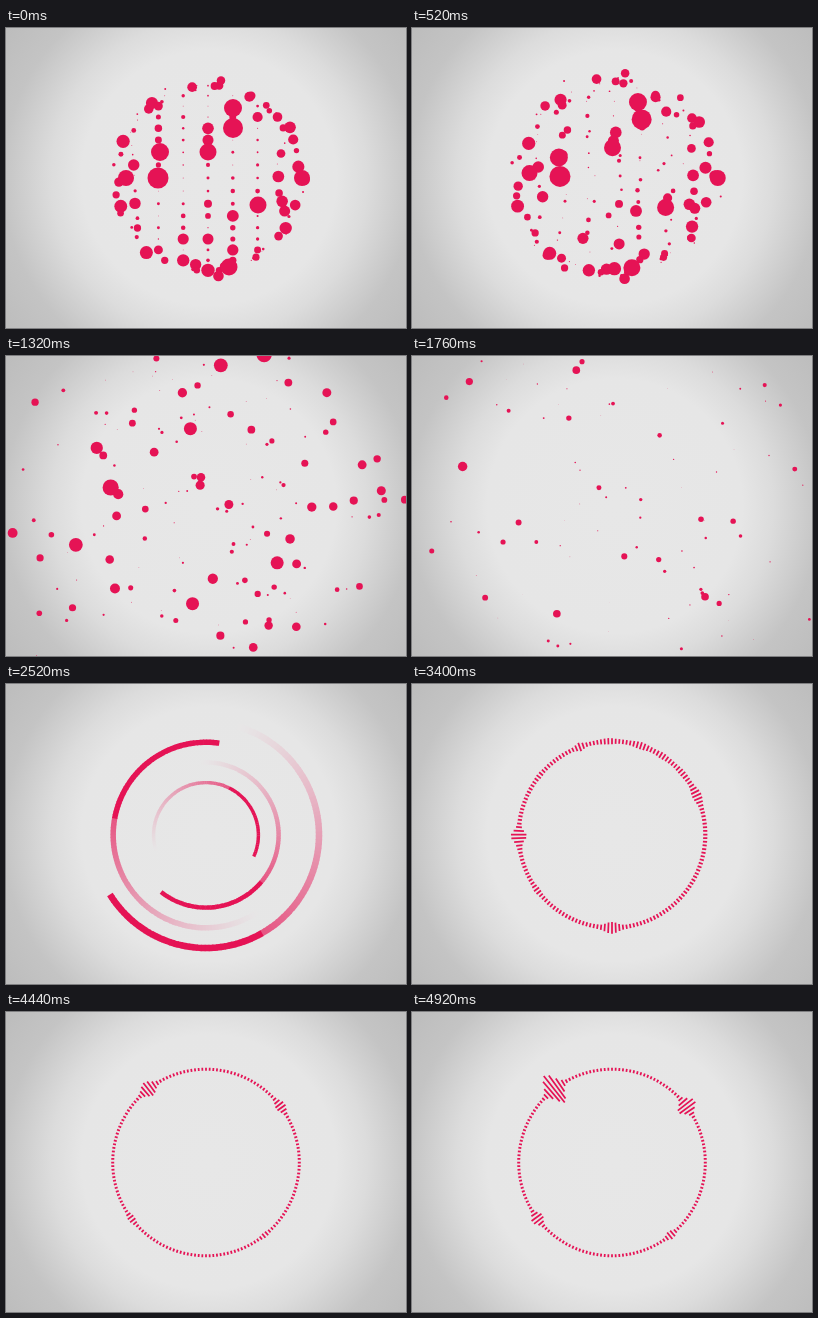
An HTML page with a canvas for the animation above (5000 ms loop, 400 by 300 pixels).

```html
<!DOCTYPE html>
<html>
<head>
<meta charset="utf-8">
<style>
html, body { margin: 0; width: 100%; height: 100%; overflow: hidden; background: #e7e7e7; }
canvas { display: block; }
</style>
</head>
<body>
<canvas id="stage" width="400" height="300"></canvas>
<script>
const ctx = document.getElementById('stage').getContext('2d');
const LOOP = 5000, ARCS_AT = 2100, RING_AT = 3120;
const PINK = [229, 19, 85], PAPER = [231, 231, 231];
const TAU = Math.PI * 2, RAD = Math.PI / 180;

const mix = (a, b, k) => a + (b - a) * k;
const clamp = v => Math.min(1, Math.max(0, v));
const bell = v => Math.exp(-v * v);
const tint = k => `rgb(${PAPER.map((c, i) => Math.round(mix(c, PINK[i], k))).join()})`;

let seed = 71;
function random() {
  seed = (seed * 16807) % 2147483647;
  return seed / 2147483647;
}
const spread = size => (random() + random() - 1) * size;

const backdrop = ctx.createRadialGradient(203, 150, 0, 203, 150, 255);
[[0, '#e7e7e7'], [.5, '#e6e6e6'], [.62, '#dcdcdc'], [.81, '#c4c4c4'], [1, '#bcbcbc']]
  .forEach(stop => backdrop.addColorStop(...stop));

// Dots sit on columns that bend to follow the rim of a sphere, then drift apart.
const CENTER = { x: 202, y: 150 }, SPHERE = 93;
const dots = [];

function addDot(x, y, r) {
  dots.push({
    x, y, r,
    dx: (x - CENTER.x) * .22 + spread(48),
    dy: (y - CENTER.y) * .2 + spread(48)
  });
}

function buildSphere() {
  for (let column = -4; column <= 4; column++) {
    for (let row = -8; row <= 8; row++) {
      const dy = 13.3 * row - .22 * row * Math.abs(row);
      const rim = Math.sqrt(Math.max(0, SPHERE ** 2 - dy ** 2));
      const loose = Math.abs(column) > 2 ? 7 : 0;
      const dx = Math.sign(column) * Math.min(Math.abs(column) * 24.8, rim);
      addDot(CENTER.x + dx + spread(loose), CENTER.y + dy + spread(loose),
        .4 + 6.4 * random() ** 1.9);
    }
  }
  const largest = [[152, 150, 10.5], [154, 124, 9], [202, 124, 8.5], [227, 80, 9],
    [227, 100, 10], [252, 177, 8.5], [223, 239, 8.5], [120, 150, 8], [296, 150, 8]];
  largest.forEach(dot => addDot(...dot));
}
buildSphere();

function drawDots(t) {
  const drift = (t / 1000) ** 2.65;
  const shrink = 1 - .55 * clamp((t - 1000) / 760);
  ctx.fillStyle = tint(1);
  for (const { x, y, r, dx, dy } of dots) {
    ctx.beginPath();
    ctx.arc(x + dx * drift, y + dy * drift, r * shrink, 0, TAU);
    ctx.fill();
  }
}

// Opacity by distance in degrees behind an arc's head.
const TAIL = 222, SOLID = 88;
const fadeAt = d => d < SOLID ? 1 : .68 * ((TAIL - d) / (TAIL - SOLID)) ** 1.2;

function drawArcs(t) {
  const turn = (t - 2520) * .25;
  [148, 278, 128, 24].forEach((start, i) => {
    const head = start + turn;
    const radius = 113 - 20.2 * i;
    ctx.lineWidth = 6.5 - 1.03 * i;
    for (let d = TAIL - 2; d >= 0; d -= 2) {
      ctx.strokeStyle = tint(fadeAt(d));
      ctx.beginPath();
      ctx.arc(200, 151, radius, (head - d - 2) * RAD, (head - d + (d ? .4 : 0)) * RAD);
      ctx.stroke();
    }
  });
}

// Short bursts play around the ring before a few lasting swells take over.
const bursts = Array.from({ length: 56 }, (_, i) => {
  const time = RING_AT + i * 20;
  const loud = time > 3560 ? 30 * random() ** 4 : 0;
  return { time, angle: random() * 360, width: 2 + 4 * random(), height: 3 + 4 * random() + loud };
});
const swells = [232, 323, 143, 51].map((angle, i) =>
  ({ angle, width: 4.5 - .5 * i, height: 31 * .57 ** i }));

function tickLength(angle, t) {
  const bump = peak => peak.height * bell((((angle - peak.angle + 540) % 360) - 180) / peak.width);
  const swell = clamp((t - 4200) / 720) ** .8;
  let length = mix(4.2, 3, clamp((t - 3400) / 800));
  for (const burst of bursts) length += bump(burst) * bell((t - burst.time) / 100);
  for (const peak of swells) length += bump(peak) * swell;
  return length;
}

function drawRing(t) {
  const count = 160, radius = 93.3;
  ctx.strokeStyle = tint(1);
  ctx.lineWidth = 1.75;
  ctx.beginPath();
  for (let i = 0; i < count; i++) {
    const angle = i * 360 / count;
    const half = tickLength(angle, t) / 2;
    const c = Math.cos(angle * RAD), s = Math.sin(angle * RAD);
    ctx.moveTo(200 + (radius - half) * c, 150.5 + (radius - half) * s);
    ctx.lineTo(200 + (radius + half) * c, 150.5 + (radius + half) * s);
  }
  ctx.stroke();
}

const began = performance.now();
function render() {
  const t = (performance.now() - began) % LOOP;
  ctx.fillStyle = backdrop;
  ctx.fillRect(0, 0, 400, 300);
  if (t < ARCS_AT) drawDots(t);
  else if (t < RING_AT) drawArcs(t);
  else drawRing(t);
  requestAnimationFrame(render);
}
render();
</script>
</body>
</html>
```
